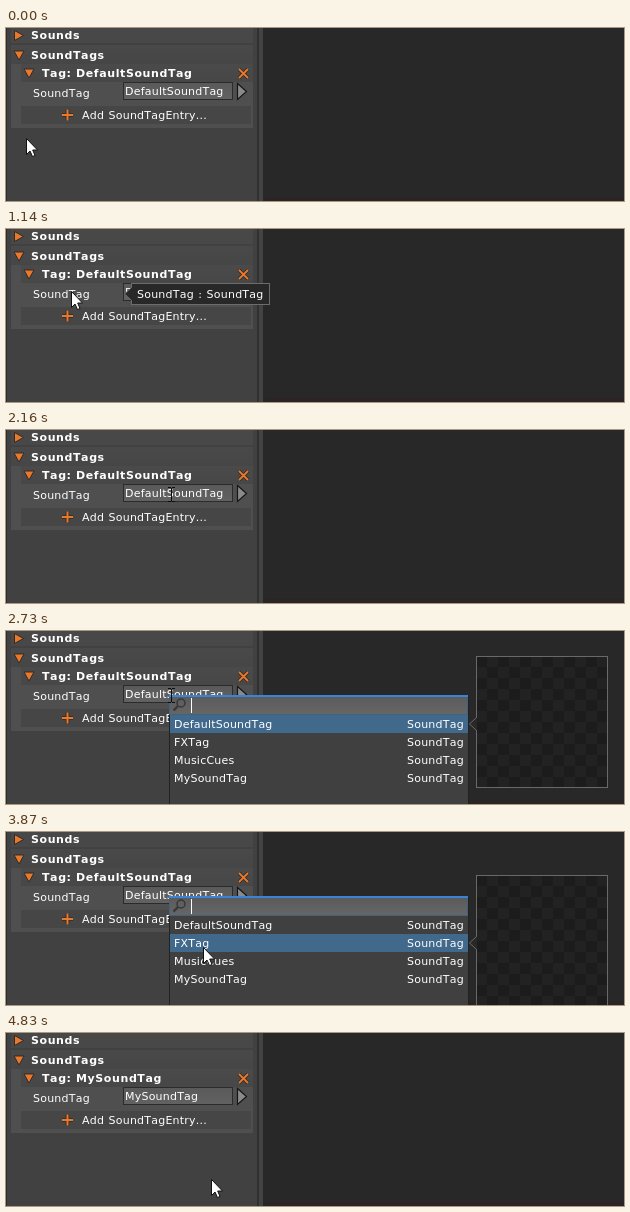
An HTML page with a canvas that plays this animation: 618 px wide and 173 px high, repeating every 5.37 s.

```html
<!DOCTYPE html>
<html lang="en">
<head>
<meta charset="utf-8">
<title>Sound tag picker</title>
<style>
html, body { margin: 0; width: 100%; height: 100%; overflow: hidden; background: #282828; }
canvas { display: block; }
</style>
</head>
<body>
<canvas id="stage" width="618" height="173"></canvas>
<script>
const ctx = document.getElementById('stage').getContext('2d');
const LOOP = 5370, STEP = 30;
const ORANGE = '#ea782b', OUTLINE = '#2f2b28';
const ROWS = ['DefaultSoundTag', 'FXTag', 'MusicCues', 'MySoundTag'];
const ROW_TOP = 84, ROW_H = 18;

const linear = p => p;
const smooth = p => p * p * (3 - 2 * p);
const easeIn = p => p * p * (2 - p);
const clamp = v => Math.max(0, Math.min(1, v));

// time, x, y, easing towards this point
const PATH = [
  [390, 20, 110, linear],
  [990, 65, 62, smooth],
  [1260, 65, 62, linear],
  [2160, 165, 64, smooth],
  [3240, 165, 64, linear],
  [3570, 188, 86, easeIn],
  [4140, 205, 141, linear],
  [4230, 205, 146, linear]
];

function pointer(t) {
  let a = PATH[0];
  for (const b of PATH) {
    if (t < b[0]) {
      const p = clamp(b[3](clamp((t - a[0]) / (b[0] - a[0]))));
      return { x: Math.round(a[1] + (b[1] - a[1]) * p), y: Math.round(a[2] + (b[2] - a[2]) * p) };
    }
    a = b;
  }
  return { x: a[1], y: a[2] };
}

function rect(x, y, w, h, color) {
  ctx.fillStyle = color;
  ctx.fillRect(x, y, w, h);
}

function frame(x, y, w, h, color) {
  ctx.strokeStyle = color;
  ctx.lineWidth = 1;
  ctx.strokeRect(x + 0.5, y + 0.5, w - 1, h - 1);
}

function shade(x, y, w, h, top, bottom) {
  const g = ctx.createLinearGradient(0, y, 0, y + h);
  g.addColorStop(0, top);
  g.addColorStop(1, bottom);
  rect(x, y, w, h, g);
}

function poly(points, fill, line, width = 1) {
  ctx.beginPath();
  points.forEach(([x, y]) => ctx.lineTo(x, y));
  ctx.closePath();
  if (fill) { ctx.fillStyle = fill; ctx.fill(); }
  if (line) { ctx.strokeStyle = line; ctx.lineWidth = width; ctx.stroke(); }
}

function stroke(points, color, width) {
  ctx.beginPath();
  points.forEach(([x, y], i) => i % 2 ? ctx.lineTo(x, y) : ctx.moveTo(x, y));
  ctx.strokeStyle = color;
  ctx.lineWidth = width;
  ctx.stroke();
}

function text(str, x, y, bold = false) {
  ctx.font = (bold ? 'bold ' : '') + '11px "DejaVu Sans", Verdana, sans-serif';
  ctx.fontKerning = 'none';
  ctx.letterSpacing = bold ? '0.6px' : '0.22px';
  ctx.wordSpacing = bold ? '0px' : '0.7px';
  ctx.fillStyle = '#fff';
  ctx.fillText(str, x, y);
}

function foldout(x, y) {
  poly([[x, y], [x + 10, y], [x + 5, y + 9]], ORANGE, OUTLINE);
}

function panel(tag) {
  rect(0, 0, 618, 173, '#282828');
  rect(257, 169, 361, 4, '#2a2425');
  rect(0, 0, 251, 173, '#414141');
  rect(0, 0, 1, 173, '#2c2c2c');
  rect(251, 0, 2, 173, '#303030');
  rect(253, 0, 4, 173, '#434343');

  rect(5, 0, 242, 15, '#484848');
  rect(5, 17, 242, 83, '#4f4f4f');
  shade(5, 17, 242, 19, '#494949', '#464646');
  shade(15, 36, 232, 18, '#4a4a4a', '#474747');
  rect(15, 78, 230, 18, '#464646');

  poly([[8.5, 2.5], [17.5, 7.5], [8.5, 12.5]], ORANGE, OUTLINE);
  text('Sounds', 25, 11, true);
  foldout(8, 23);
  text('SoundTags', 25, 31, true);
  foldout(18, 41);
  text('Tag: ' + tag, 36, 49, true);
  const cross = [[233, 41], [242, 50], [242, 41], [233, 50]];
  stroke(cross, OUTLINE, 3.4);
  stroke(cross, ORANGE, 1.8);

  text('SoundTag', 27, 69);
  shade(117, 54, 110, 18, '#595959', '#626262');
  frame(117, 54, 110, 18, '#2b2b2b');
  text(tag, 119, 67);
  poly([[231.5, 55.5], [240.5, 63.5], [231.5, 71.5]], '#8a8a8a', '#161616', 1.2);

  const plus = [[56, 87], [67, 87], [61.5, 81.5], [61.5, 92.5]];
  stroke(plus, OUTLINE, 3.6);
  stroke(plus, ORANGE, 2);
  text('Add SoundTagEntry...', 76, 91);
}

function tooltip() {
  rect(125, 54, 139, 22, '#282828');
  frame(125, 54, 139, 22, '#6c6c6c');
  poly([[126, 58.5], [118.5, 65], [126, 71.5]], '#282828');
  stroke([[125.5, 58.5], [118.5, 65], [118.5, 65], [125.5, 71.5]], '#6c6c6c', 1);
  text('SoundTag : SoundTag', 131, 69);
}

function preview(row) {
  const x = 470, y = 25 + row * ROW_H, size = 132, cell = 11;
  rect(x, y, size, size, '#1c1c1c');
  for (let i = 0; i < 144; i++) {
    const cx = i % 12, cy = Math.floor(i / 12);
    if ((cx + cy) % 2) rect(x + cx * cell, y + cy * cell, cell, cell, '#222');
  }
  frame(x, y, size, size, '#696969');
  const mid = y + 68;
  poly([[471, mid - 6.5], [463.5, mid], [471, mid + 6.5]], '#282828');
  stroke([[470.5, mid - 6.5], [463.5, mid], [463.5, mid], [470.5, mid + 6.5]], '#696969', 1);
}

function popup(row) {
  rect(163, 64, 300, 109, '#404040');
  frame(163, 64, 300, 110, '#222');
  shade(164, 66, 298, 17, '#5b5b5b', '#666');
  frame(163, 65, 299, 19, '#41617f');
  rect(163, 64, 299, 2, '#3984d6');

  ctx.beginPath();
  ctx.arc(175, 72, 4, 0, Math.PI * 2);
  ctx.strokeStyle = '#383838';
  ctx.lineWidth = 1.5;
  ctx.stroke();
  stroke([[172, 75], [167.5, 79.5]], '#383838', 2.4);
  rect(185, 67, 1, 15, '#fff');

  rect(164, ROW_TOP + row * ROW_H, 298, ROW_H, '#40698c');
  ROWS.forEach((name, i) => {
    const base = ROW_TOP + 13 + i * ROW_H;
    text(name, 168, base);
    text('SoundTag', 401, base);
  });
  preview(row);
}

function arrow(x, y) {
  poly([[x + 0.5, y + 0.5], [x + 0.5, y + 16.5], [x + 4, y + 13], [x + 6.5, y + 18.5],
    [x + 9, y + 17.5], [x + 6.7, y + 12], [x + 11.5, y + 12]], '#fff', '#111');
}

function beam(x, y) {
  rect(x, y - 6, 1, 13, '#0c0c0c');
  for (const dy of [-7, 7]) {
    rect(x - 3, y + dy, 3, 1, '#0c0c0c');
    rect(x + 1, y + dy, 3, 1, '#0c0c0c');
  }
}

function faded(alpha, paint) {
  if (alpha <= 0) return;
  ctx.globalAlpha = alpha;
  paint();
  ctx.globalAlpha = 1;
}

function draw(time) {
  const t = Math.floor(time / STEP) * STEP;
  const { x, y } = pointer(t);
  const chosen = t >= 4740;
  panel(ROWS[chosen ? 3 : 0]);

  if (t >= 1080 && x < 117) faded(clamp((t - 1050) / 90), tooltip);

  const open = t < 4740 ? clamp((t - 2640) / 90) : clamp((4830 - t) / 120);
  if (open > 0) {
    // selection trails the pointer slightly
    const row = Math.max(0, Math.min(3, Math.floor((pointer(t - 60).y - ROW_TOP) / ROW_H)));
    faded(open, () => popup(row));
  }

  const overField = x >= 117 && y < ROW_TOP;
  (overField ? beam : arrow)(x, y);
}

const start = performance.now();
function tick() {
  draw((performance.now() - start) % LOOP);
  requestAnimationFrame(tick);
}
tick();
</script>
</body>
</html>
```
